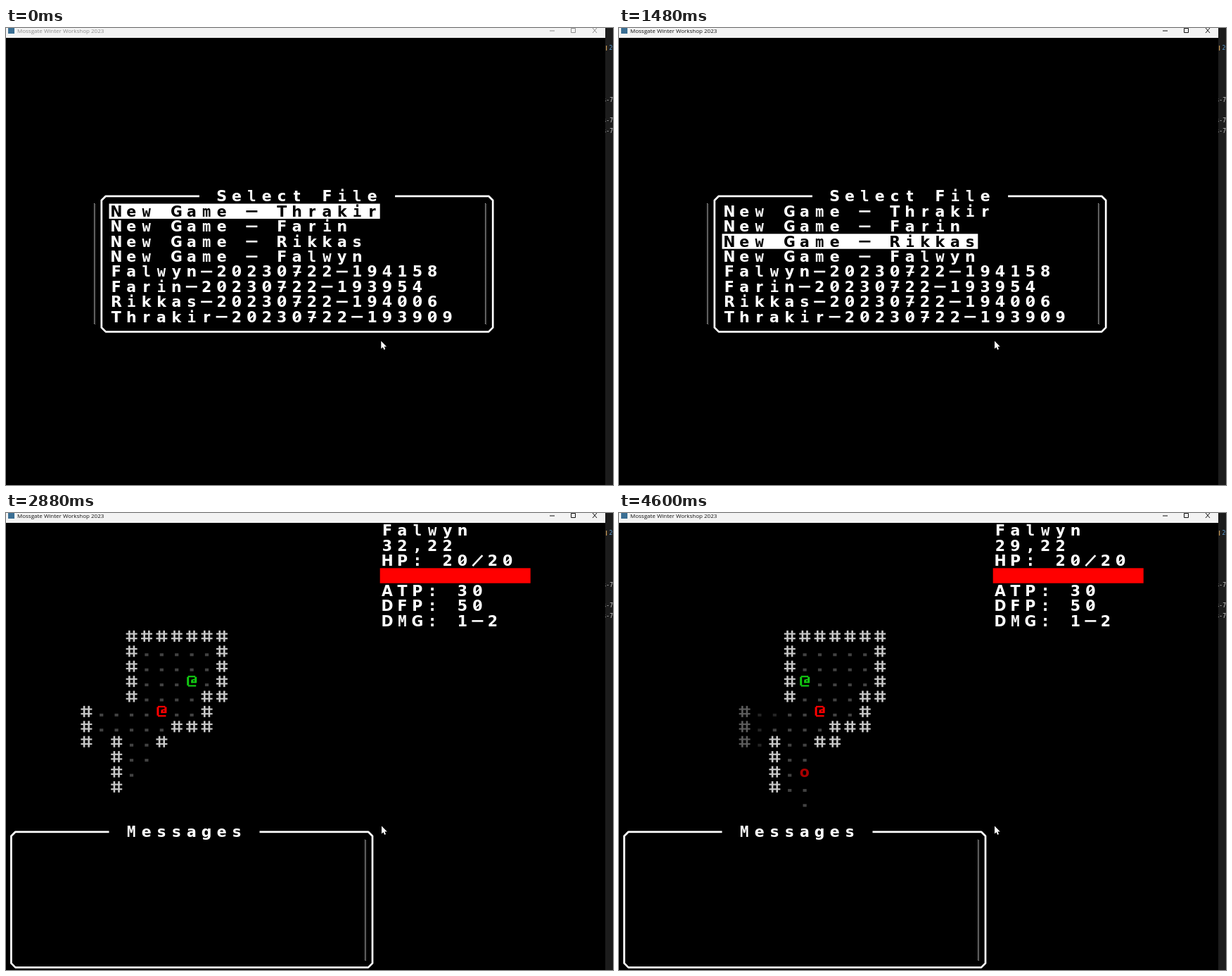
These frames come from a looping animation (863x649 px, 8 s). An HTML page with a canvas:

```html
<!DOCTYPE html>
<html lang="en">
<head>
<meta charset="utf-8">
<title>Dungeon</title>
<style>
html, body { margin: 0; width: 100%; height: 100%; overflow: hidden; background: #000; }
canvas { display: block; }
</style>
</head>
<body>
<canvas id="stage" width="863" height="649"></canvas>
<script>
const ctx = document.getElementById('stage').getContext('2d');
const LOOP = 8000;
const CELL = 21.4, LEFT = -3.3, TOP = 14.1;
const WHITE = '#fff';
const WIDE_FONT = 'bold 20.5px "DejaVu Sans", sans-serif';
const SLAB_FONT = 'bold 20.5px "DejaVu Sans Mono", monospace';
const colX = c => LEFT + c * CELL;
const rowY = r => TOP + r * CELL;
const midX = c => colX(c + 0.5);
const midY = r => rowY(r + 0.5);

const FILES = [
  'New Game - Thrakir', 'New Game - Farin', 'New Game - Rikkas', 'New Game - Falwyn',
  'Falwyn-20230722-194158', 'Farin-20230722-193954',
  'Rikkas-20230722-194006', 'Thrakir-20230722-193909'
];
const SELECT_TIMES = [1080, 1480, 1730, 2020];
const GAME_START = 2880;
const STEP_TIMES = [3960, 4330, 4600];

const MAP_COL = 5, MAP_ROW = 7;
const MAP = [
  '   #######',
  '   #.....#',
  '   #.....#',
  '   #.....#',
  '   #....##',
  '#.......#',
  '#.....###',
  '#.#..##',
  '  #..',
  '  #..',
  '  #..',
  '    .'
];
// Step at which a tile first comes into view, keyed by "col,row".
const SEEN_AT = { '6,14': 1, '9,16': 1, '8,17': 1, '9,17': 1, '9,18': 3, '11,14': 3 };
const ALLY = [[10, 12], [11, 12], [10, 12], [10, 12]];
const ORC = [null, [9, 17], [9, 17], [9, 16]];

const countPassed = (times, t) => times.filter(x => t >= x).length;

function rect(x, y, w, h, color) {
  ctx.fillStyle = color;
  ctx.fillRect(x, y, w, h);
}

function line(points, width, color) {
  ctx.beginPath();
  points.forEach(([x, y]) => ctx.lineTo(x, y));
  ctx.lineWidth = width;
  ctx.strokeStyle = color;
  ctx.stroke();
}

function label(str, x, y, font, color) {
  ctx.font = font;
  ctx.textAlign = 'left';
  ctx.fillStyle = color;
  ctx.fillText(str, x, y);
}

function glyph(ch, c, r, color) {
  const x = midX(c) - 0.4, base = rowY(r) + 18.2;
  if (ch === ' ') return;
  if (ch === '-') return rect(x - 8, base - 8.6, 16, 2.6, color);
  if (ch === '/') return line([[x - 7, base], [x + 7, base - 15]], 2.6, color);
  ctx.font = /[ilmwM]/.test(ch) ? SLAB_FONT : WIDE_FONT;
  ctx.textAlign = 'center';
  ctx.fillStyle = color;
  ctx.fillText(ch, x, base);
  if (ch === '0') line([[x - 4, base - 3.5], [x + 4, base - 11]], 1.8, color);
  if (ch === '7') rect(x - 5, base - 7.5, 11, 2, color);
}

function write(str, c, r, color = WHITE) {
  [...str].forEach((ch, i) => glyph(ch, c + i, r, color));
}

function panel(c0, r0, c1, r1, title, titleCol) {
  const l = midX(c0), t = midY(r0), r = midX(c1), b = midY(r1), k = 6;
  line([
    [colX(titleCol - 1), t], [l + k, t], [l, t + k], [l, b - k], [l + k, b],
    [r - k, b], [r, b - k], [r, t + k], [r - k, t], [colX(titleCol + title.length + 1), t]
  ], 2.7, WHITE);
  write(title, titleCol, r0);
}

function scrollTrack(c, r0, r1) {
  const x = Math.floor(colX(c));
  for (let y = Math.round(rowY(r0)); y < rowY(r1); y += 2) {
    rect(x, y, 1, 1, '#e0e0e0');
    rect(x + 1, y + 1, 1, 1, '#909090');
  }
}

function wall(c, r, color) {
  const x = midX(c), y = midY(r) + 0.3;
  for (const d of [-3.3, 3.3]) {
    line([[x + d, y - 8], [x + d, y + 8]], 2.6, color);
    line([[x - 8, y + d], [x + 8, y + d]], 2.2, color);
  }
}

function hero(c, r, color) {
  const x = midX(c), y = midY(r);
  rect(x - 7, y - 6, 3, 12, color);
  rect(x - 5.5, y - 7.7, 10.5, 2.2, color);
  rect(x + 4, y - 6, 3, 8.5, color);
  rect(x - 1, y - 2.2, 3, 4.7, color);
  rect(x - 1, y + 0.4, 7, 2.1, color);
  rect(x + 1, y - 3, 4, 1.8, color);
  rect(x - 5.5, y + 5.5, 11.5, 2.2, color);
}

function drawMenu(selected) {
  panel(6, 10, 32, 19, 'Select File', 14);
  scrollTrack(6, 11, 19);
  scrollTrack(32, 11, 19);
  FILES.forEach((name, i) => {
    const active = i === selected;
    if (active) rect(colX(7), rowY(11 + i), name.length * CELL, CELL, WHITE);
    write(name, 7, 11 + i, active ? '#000' : WHITE);
  });
}

function drawMap(step) {
  const ally = ALLY[step], orc = ORC[step];
  const at = (p, c, r) => p && p[0] === c && p[1] === r;
  MAP.forEach((tiles, j) => [...tiles].forEach((tile, i) => {
    const c = MAP_COL + i, r = MAP_ROW + j, x = c + step;
    if (tile === ' ' || step < (SEEN_AT[c + ',' + r] || 0)) return;
    if (at(ally, c, r)) return hero(x, r, '#f00');
    if (at(orc, c, r)) return glyph('o', x, r, '#a80000');
    if (x === 12 && r === 10) return hero(x, r, '#12c812');
    const faded = step === 3 && (c <= 6 || (c === 7 && r === 12));
    if (tile === '#') wall(x, r, faded ? '#5c5c5c' : '#c8c8c8');
    else rect(midX(x) - 2.7, rowY(r) + 14, 5.2, 4, faded ? '#242424' : '#424242');
  }));
}

function drawGame(step) {
  const stats = ['Falwyn', `${32 - step},22`, 'HP: 20/20', '', 'ATP: 30', 'DFP: 50', 'DMG: 1-2'];
  stats.forEach((text, r) => write(text, 25, r));
  rect(colX(25), rowY(3), 10 * CELL, CELL, '#f00');
  drawMap(step);
  panel(0, 20, 24, 29, 'Messages', 8);
  scrollTrack(24, 21, 29);
}

function drawWindow(focused) {
  const ink = focused ? '#111' : '#8c8c8c';
  rect(0, 0, 852, 14, '#f3f3f3');
  rect(3, 0, 9, 8, '#3b6f94');
  label('Mossgate Winter Workshop 2023', 16, 7, '8px "Open Sans", sans-serif', ink);
  rect(773, 3.5, 7, 1, ink);
  ctx.lineWidth = 1;
  ctx.strokeStyle = ink;
  ctx.strokeRect(803.5, 0.5, 6, 6);
  line([[834, 0], [840, 7]], 1, ink);
  line([[840, 0], [834, 7]], 1, ink);
}

function drawBackdrop() {
  const font = '8px "DejaVu Sans Mono", monospace';
  rect(852, 0, 11, 649, '#1c1c1c');
  ctx.save();
  ctx.beginPath();
  ctx.rect(852, 0, 11, 649);
  ctx.clip();
  rect(853, 25, 1.2, 7, '#c99a55');
  label('20', 857.5, 31, font, '#5c9fd6');
  for (const y of [105, 134, 149]) label('s-7', 848.5, y, font, '#cfcfcf');
  ctx.restore();
}

function drawPointer(x, y) {
  ctx.beginPath();
  [[0, 0], [0, 11], [2.5, 8.8], [4.2, 12.4], [6, 11.6], [4.4, 8], [7.8, 8]]
    .forEach(([dx, dy]) => ctx.lineTo(x + dx, y + dy));
  ctx.closePath();
  ctx.fillStyle = WHITE;
  ctx.fill();
}

function draw(now) {
  const t = now % LOOP;
  rect(0, 0, 863, 649, '#000');
  drawBackdrop();
  drawWindow(t >= 540);
  if (t < GAME_START) drawMenu(countPassed(SELECT_TIMES, t));
  else drawGame(countPassed(STEP_TIMES, t));
  drawPointer(t < 120 ? 533.3 : 534, 444.5);
  requestAnimationFrame(draw);
}

ctx.lineJoin = 'round';
draw(performance.now());
</script>
</body>
</html>
```
